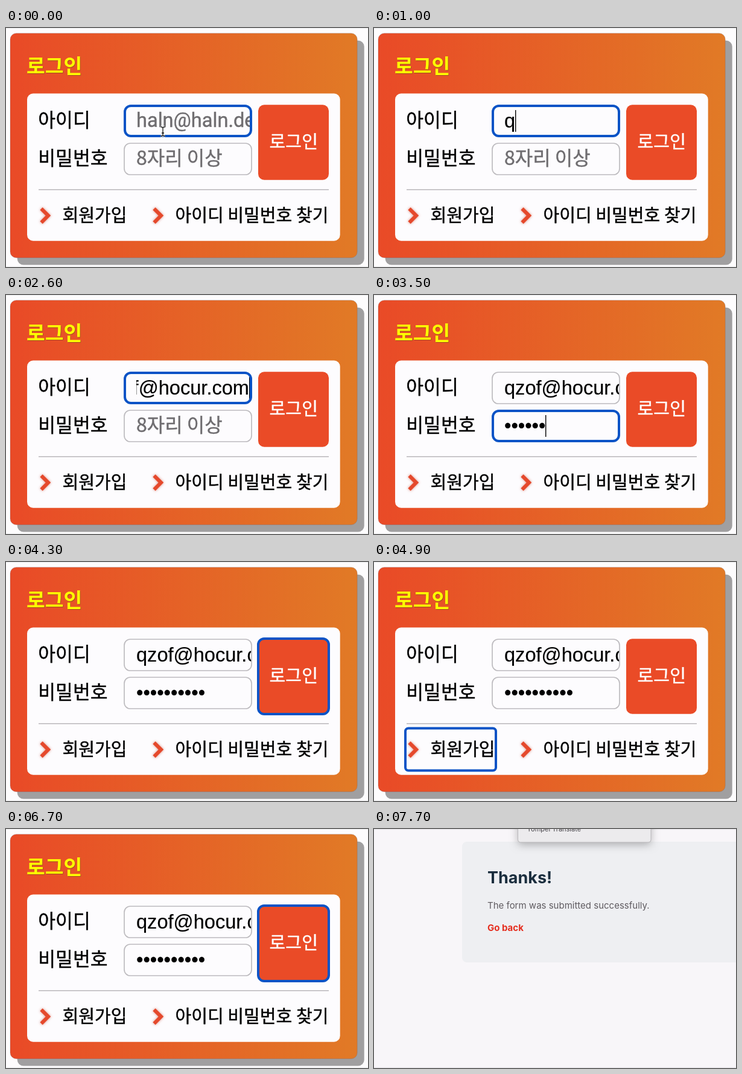
An HTML page with a canvas that plays this animation: 600 px wide and 396 px high, repeating every 7800 ms.

```html
<!DOCTYPE html>
<html lang="ko">
<head>
<meta charset="utf-8">
<title>로그인</title>
<style>
html, body { margin: 0; width: 100%; height: 100%; overflow: hidden; background: #fdfcfd; }
canvas { display: block; width: 600px; height: 396px; }
</style>
</head>
<body>
<canvas id="stage" width="600" height="396"></canvas>
<script>
const ctx = document.getElementById('stage').getContext('2d');
const LOOP = 7800;
const KR = '"Noto Sans CJK KR", "Noto Sans CJK", sans-serif';
const LATIN = '"Liberation Sans", Arial, sans-serif';
const UI = 'Inter, sans-serif';
const BLUE = '#0a53c6', RED = '#ea4b27', PAPER = '#fdfcfe', LINE = '#bdbbbf';
const HINT = '#6f6d70', SELECT = '#a6cdfd';
const EMAIL = 'qzof@hocur.com';
const PAD = 216, EDGE = 403;

// Focus order: start time and focused control
const FOCUS = [
  [0, 'id'], [2800, 'pw'], [4300, 'button'], [4700, 'join'], [5100, 'find'],
  [5400, 'join'], [5500, 'button'], [5600, 'pw'], [5700, 'id'], [6100, 'pw'], [6500, 'button']
];
const typed = (t, start, step, max) =>
  t < start ? 0 : Math.min(max, 1 + Math.floor((t - start) / step));

function box(x, y, w, h, r, fill, stroke, weight) {
  ctx.beginPath();
  ctx.roundRect(x, y, w, h, r);
  if (fill) { ctx.fillStyle = fill; ctx.fill(); }
  if (stroke) { ctx.strokeStyle = stroke; ctx.lineWidth = weight; ctx.stroke(); }
}

// bolder: extra outline width that thickens the strokes a little
function text(s, x, y, font, color, bolder = 0) {
  ctx.font = font;
  ctx.fillStyle = ctx.strokeStyle = color;
  ctx.fillText(s, x, y);
  if (!bolder) return;
  ctx.lineWidth = bolder;
  ctx.lineJoin = 'round';
  ctx.strokeText(s, x, y);
}

const label = (s, x, y, size, color = '#000') =>
  text(s, x, y, size + 'px ' + KR, color, 0.45);

function ring(x, y, w, h, r) {
  box(x + 2, y + 2, w - 4, h - 4, r, null, BLUE, 4);
}

function chevron(x, y) {
  ctx.save();
  ctx.shadowColor = 'rgba(215,130,115,.9)';
  ctx.shadowBlur = 4;
  ctx.strokeStyle = '#e5492c';
  ctx.lineWidth = 6;
  ctx.lineJoin = 'miter';
  ctx.beginPath();
  ctx.moveTo(x, y - 11.5);
  ctx.lineTo(x + 11.5, y);
  ctx.lineTo(x, y + 11.5);
  ctx.stroke();
  ctx.restore();
}

function field(y, value, hint, hintFont, active, selected, caret) {
  box(196, y, 211, 52, 10, PAPER);
  ctx.save();
  ctx.beginPath();
  ctx.rect(PAD, y, 190.5, 52);
  ctx.clip();
  if (value) {
    ctx.font = '32.6px ' + LATIN;
    const w = ctx.measureText(value).width;
    const shift = active && !selected ? Math.max(0, w - (EDGE - PAD)) : 0;
    if (selected) {
      ctx.fillStyle = SELECT;
      ctx.fillRect(PAD, y + 4, Math.min(w, EDGE + 1 - PAD), 44);
    }
    text(value, PAD - shift, y + 37, ctx.font, '#000', 0.2);
    if (caret) ctx.fillRect(Math.round(PAD + w - shift), y + 8, 1.4, 36);
  } else {
    text(hint, PAD, y + 36, hintFont, HINT, 0.45);
  }
  ctx.restore();
  if (active) ring(195, y - 1, 213, 54, 10);
  else box(196, y, 211, 52, 10, null, LINE, 1.7);
}

function pointer(x, y) {
  const trace = () => {
    ctx.beginPath();
    ctx.moveTo(x - 3.5, y - 7); ctx.lineTo(x - 1.5, y - 7); ctx.lineTo(x, y - 5.5);
    ctx.lineTo(x + 1.5, y - 7); ctx.lineTo(x + 3.5, y - 7);
    ctx.moveTo(x, y - 5.5); ctx.lineTo(x, y + 6.5);
    ctx.moveTo(x - 3.5, y + 8); ctx.lineTo(x - 1.5, y + 8); ctx.lineTo(x, y + 6.5);
    ctx.lineTo(x + 1.5, y + 8); ctx.lineTo(x + 3.5, y + 8);
    ctx.moveTo(x - 2, y + 3); ctx.lineTo(x + 2, y + 3);
    ctx.stroke();
  };
  ctx.strokeStyle = '#fff'; ctx.lineWidth = 3.2; trace();
  ctx.strokeStyle = '#111'; ctx.lineWidth = 1.3; trace();
}

function edges(color) {
  ctx.fillStyle = color;
  ctx.fillRect(0, 0, 600, 1);
  ctx.fillRect(0, 395, 600, 1);
}

function login(t) {
  const focus = FOCUS.filter(f => f[0] <= t).pop()[1];
  const letters = typed(t, 900, 110, 11) + typed(t, 2150, 120, 3);
  const dots = typed(t, 3000, 100, 10);
  const again = t >= 5500;

  ctx.fillStyle = '#fdfcfd';
  ctx.fillRect(0, 0, 600, 396);
  edges('#ececee');
  box(18.7, 20.7, 575, 371.8, 10, '#a09fa0');
  const grad = ctx.createLinearGradient(7, 0, 582, 0);
  grad.addColorStop(0, '#e94a27');
  grad.addColorStop(1, '#e17a26');
  box(7, 8.7, 575.2, 372, 10, grad, 'rgba(90,90,120,.35)', 0.7);

  ctx.save();
  ctx.shadowColor = 'rgba(110,80,20,.6)';
  ctx.shadowOffsetX = ctx.shadowOffsetY = 0.8;
  ctx.shadowBlur = 1;
  text('로그인', 34, 75, 'bold 33.4px ' + KR, '#ffff00');
  ctx.restore();

  box(35, 108.5, 518.7, 244.2, 10, PAPER);
  label('아이디', 53.3, 164, 31.3);
  label('비밀번호', 53.3, 227, 31.3);
  field(128, EMAIL.slice(0, letters), 'haln@haln.dev', '32.6px Roboto, sans-serif',
    focus === 'id', again && focus === 'id', focus === 'id' && letters > 0 && !again);
  field(191, '•'.repeat(dots), '8자리 이상', '32px ' + KR,
    focus === 'pw', again && focus === 'pw', focus === 'pw' && !again);

  box(418, 127.2, 117, 124.6, 10, RED);
  label('로그인', 436.6, 198.7, 29.1, '#fff');
  ctx.fillStyle = LINE;
  ctx.fillRect(54, 267, 481, 1.6);
  chevron(58.5, 310.8);
  chevron(245.5, 310.8);
  label('회원가입', 93.5, 320.6, 29.1);
  label('아이디 비밀번호 찾기', 280.5, 320.6, 29.1);

  if (focus === 'button') ring(416, 125, 121, 129, 10);
  if (focus === 'join') ring(50, 273.5, 154, 74, 5);
  if (focus === 'find') ring(237, 273.5, 303, 74, 5);
  if (t < 900) pointer(260, 171);
}

function thanks(t) {
  ctx.fillStyle = '#f8f6f9';
  ctx.fillRect(0, 0, 600, 396);
  edges('#e4e2e6');
  box(146, 21, 470, 200, 8, '#eeeff2');
  text('Thanks!', 188, 89.5, 'bold 27px ' + UI, '#1b2e3e');
  text('The form was submitted successfully.', 188, 132, '15px ' + UI, '#5f5b60');
  text('Go back', 188, 168.6, 'bold 15px ' + UI, '#e52f20');
  if (t < 7200) return;
  ctx.save();
  ctx.shadowColor = 'rgba(0,0,0,.28)';
  ctx.shadowBlur = 14;
  ctx.shadowOffsetY = 4;
  box(238.5, -30, 220.5, 52, 4, '#ecebed');
  ctx.restore();
  box(238.5, -30, 220.5, 52, 4, null, '#b9b8bb', 1);
  text('Yompel Translate', 253.5, 4, '11px ' + UI, '#454348');
}

function draw() {
  const t = performance.now() % LOOP;
  if (t < 7100) login(t);
  else thanks(t);
  requestAnimationFrame(draw);
}
draw();
</script>
</body>
</html>
```
